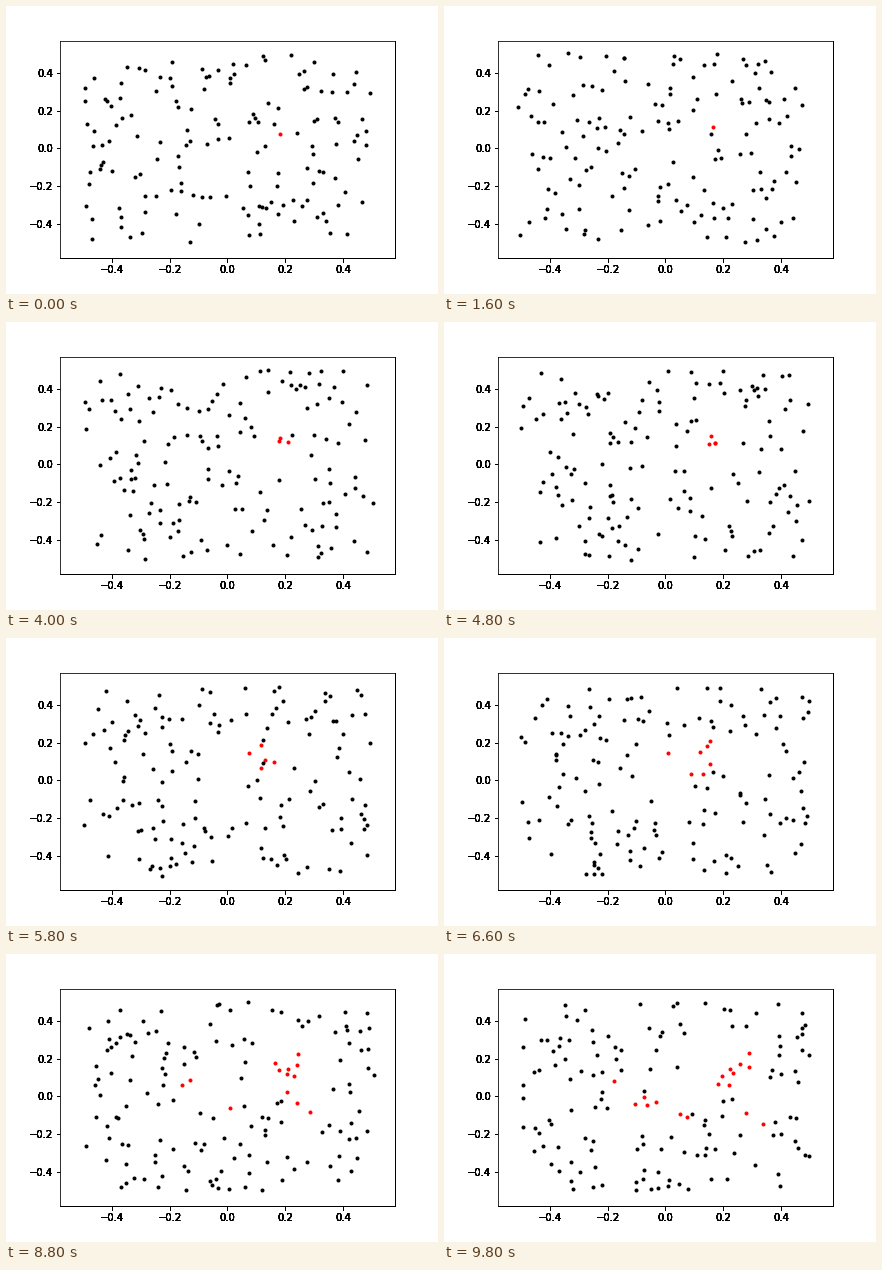
These frames come from a looping animation (432x288 px, 10000 ms). A matplotlib script:

```python
import numpy as np
import matplotlib.pyplot as plt
from matplotlib.animation import FuncAnimation

FRAMES, INTERVAL = 50, 200
COUNT = 150
SPEED = 0.5 / 30
CONTACT = 0.02
HALF = 0.5

rng = np.random.default_rng(7)


def first_carrier(t):
    """The first carrier drifts slowly through a few key points."""
    times = [0, 8, 16, 33, 49]
    return (np.interp(t, times, [.183, .166, .187, .155, .280]),
            np.interp(t, times, [.078, .114, .133, .088, -.088]))


def cases(t):
    """Carriers at step t: one at first, then exponential growth."""
    return 1 if t <= 16 else round(4 * np.exp(0.058 * (t - 24)))


def distances(a, b):
    return np.linalg.norm(a[:, None] - b[None], axis=2)


def collide(pos, vel):
    """Elastic impact of equal discs; the first carrier is left out."""
    near = np.triu(distances(pos, pos) < CONTACT, 1)
    near[0] = False
    for i, j in zip(*np.where(near)):
        axis = pos[i] - pos[j]
        axis /= np.linalg.norm(axis)
        closing = np.dot(vel[i] - vel[j], axis)
        if closing < 0:
            vel[i] -= closing * axis
            vel[j] += closing * axis


def bounce(pos, vel):
    outside = np.abs(pos) > HALF
    vel[outside] = -np.sign(pos[outside]) * np.abs(vel[outside])


def spread(pos, sick, total):
    """Infect the healthy disc closest to any carrier until total is met."""
    while sick.sum() < total:
        gap = distances(pos, pos[sick]).min(axis=1)
        gap[sick] = np.inf
        sick[gap.argmin()] = True


def simulate():
    pos = rng.uniform(-HALF, HALF, (COUNT, 2))
    vel = rng.uniform(-SPEED, SPEED, (COUNT, 2))
    sick = np.zeros(COUNT, bool)
    sick[0] = True
    steps = []
    for t in range(FRAMES):
        pos[0] = first_carrier(t)
        spread(pos, sick, cases(t))
        steps.append((pos.copy(), sick.copy()))
        pos += vel
        collide(pos, vel)
        bounce(pos, vel)
    return steps


steps = simulate()

fig = plt.figure(figsize=(6, 4), dpi=72, facecolor="white")
# Stacked copies of the axes make the antialiased labels darker.
for layer in range(8):
    ax = fig.add_axes([.125, .125, .775, .755], label=f"layer{layer}",
                      xlim=(-.58, .58), ylim=(-.583, .573))

red_dots, = ax.plot([], [], "r.")
black_dots, = ax.plot([], [], "k.")


def update(frame):
    pos, sick = steps[frame]
    red_dots.set_data(*pos[sick].T)
    black_dots.set_data(*pos[~sick].T)
    return red_dots, black_dots


anim = FuncAnimation(fig, update, frames=FRAMES, interval=INTERVAL,
                     repeat=True, repeat_delay=0)
plt.show()
```
